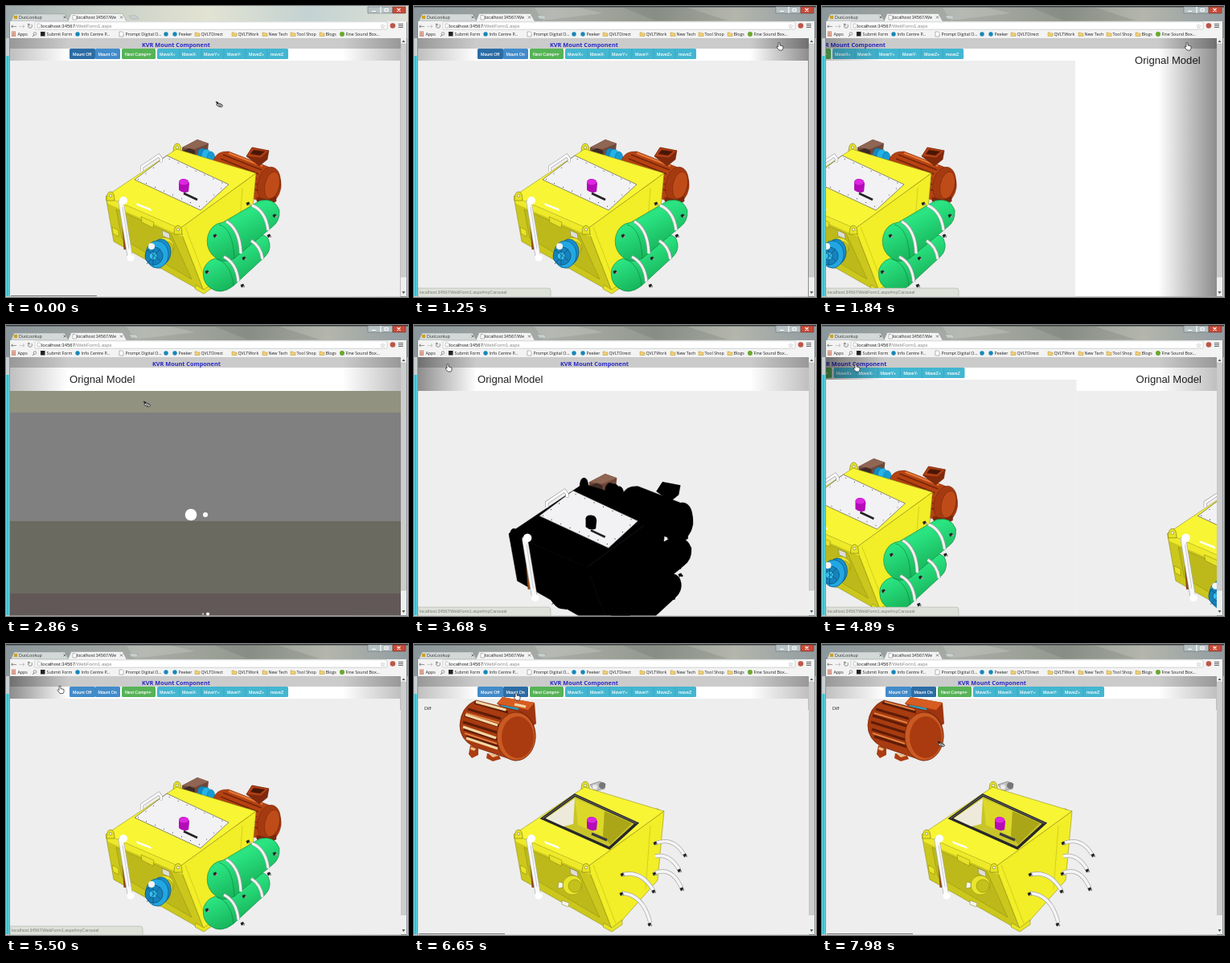
Recreate the animation shown at these times as an HTML page. Size 500 by 362 pixels, loop 8 s.

```html
<!DOCTYPE html>
<html lang="en">
<head>
<meta charset="utf-8">
<title>Mount Component</title>
<style>
html, body { margin: 0; width: 100%; height: 100%; overflow: hidden; background: #eee; }
#stage { display: block; width: 500px; height: 362px; font: 5.3px "Open Sans", sans-serif; }
.arial { font-family: "Liberation Sans", sans-serif; }
.icon { font-family: "DejaVu Sans", sans-serif; }
.title { font-weight: 700; font-size: 7.3px; fill: #2929c8; }
.head { font-size: 13.1px; fill: #222; }
.button { font-size: 5.3px; fill: #fff; stroke: #fff; stroke-width: .12; }
.dark { filter: brightness(0); }
</style>
</head>
<body>
<svg id="stage" viewBox="0 0 500 362">
<defs>
  <linearGradient id="bright">
    <stop offset="0" stop-color="#9eabac"/><stop offset=".25" stop-color="#c9cfc6"/>
    <stop offset=".5" stop-color="#e2e3d2"/><stop offset=".75" stop-color="#c3d2d2"/><stop offset="1" stop-color="#dde0d6"/>
  </linearGradient>
  <linearGradient id="dull">
    <stop offset="0" stop-color="#8c979b"/><stop offset=".35" stop-color="#a9aca5"/>
    <stop offset=".6" stop-color="#94998f"/><stop offset=".8" stop-color="#b4b6ac"/><stop offset="1" stop-color="#929ca1"/>
  </linearGradient>
  <linearGradient id="shadeL"><stop offset="0" stop-opacity=".5"/><stop offset="1" stop-opacity="0"/></linearGradient>
  <linearGradient id="shadeR"><stop offset="0" stop-opacity="0"/><stop offset="1" stop-opacity=".5"/></linearGradient>
  <linearGradient id="green" x2=".6" y2="1">
    <stop offset="0" stop-color="#20c763"/><stop offset=".4" stop-color="#2be582"/><stop offset="1" stop-color="#12a850"/>
  </linearGradient>

  <g id="lug"><path d="M-5 6Q-5-5 0-5T5 6Z" fill="#e8e426" stroke="#77740c" stroke-width=".6"/><circle r="1.8" fill="#eee" stroke="#77740c" stroke-width=".5"/></g>
  <g id="clamp"><path d="M-2.5-1 1-2.5 2.5 0-1 2.5Z" fill="#222"/><circle cx="2" cy="1" r="1.2" fill="#999"/></g>

  <g id="gear">
    <path d="M219 176 238 166 252 171 251 179 236 186 219 181Z" fill="#70483a"/>
    <path d="M219 176 238 166 252 171 235 178Z" fill="#8f6553"/>
    <path d="M220 180l8-3 7 3v5Z" fill="#3e2a25"/>
  </g>
  <g id="coupling" stroke="#086d98" stroke-width=".5">
    <ellipse cx="244" cy="185" rx="6" ry="8" fill="#1488c0"/><ellipse cx="249" cy="187" rx="6" ry="9" fill="#25b2e6"/><ellipse cx="255" cy="190" rx="5" ry="9" fill="#159bd2"/>
  </g>
  <g id="motor" stroke="#71230a" stroke-width=".5">
    <path d="M258 193Q261 180 277 181L326 200Q344 208 342 226 339 243 325 246L300 237 262 214Z" fill="#b54212"/>
    <path d="M270 185 318 204M267 190 314 209M264 195 312 215M262 201 312 222M262 207 314 230" fill="none" stroke="#74250a" stroke-width="1.4"/>
    <path d="M277 183 319 199" stroke="#e87a35" stroke-width="2"/>
    <ellipse cx="327" cy="222" rx="14" ry="22" transform="rotate(12 327 222)" fill="#a53a10"/>
    <ellipse cx="331" cy="223" rx="9" ry="17" transform="rotate(12 331 223)" fill="#bf4c18"/>
    <path d="M299 187 306 176 327 180 325 191 315 199Z" fill="#80290c"/>
    <path d="M299 187 306 176 327 180 317 189Z" fill="#b04015"/><path d="M304 184 308 179 322 181 316 186Z" fill="#491606"/>
    <path d="M312 238 326 241 336 237 336 243 326 248 312 243Z" fill="#7c280c"/>
  </g>
  <g id="shaft"><path d="M219 175 231 171 238 174 237 180 225 183Z" fill="#c4c4c4" stroke="#666" stroke-width=".6"/><circle cx="234" cy="176" r="4" fill="#777"/><circle cx="225" cy="178" r="3" fill="#ececec"/></g>
  <g id="body" stroke="#817e0c" stroke-width=".5">
    <use href="#lug" x="213" y="176"/><use href="#lug" x="302" y="210"/>
    <path d="M124 237 212 178 311 208 216 277Z" fill="#f8f535"/>
    <path d="M124 237 216 277 247 357 134 293Z" fill="#cbc71d"/>
    <path d="M216 277 311 208 303 294 247 357Z" fill="#f2ee27"/>
    <path d="M124 237 216 277 220 287 127 246Z" fill="#eeea29" stroke="none"/>
    <path d="M137 253 205 283 231 340 144 289Z" fill="#bdb91b" stroke-width=".4"/>
    <path d="M216 277 247 357M223 275 251 348M294 226 288 305" fill="none" stroke="#b5b119"/>
    <path d="M168 262 184 269 183 276 169 269Z" fill="#e6e229"/>
    <path d="M162 245 180 252 181 255 163 248Z" fill="#fff" stroke="none"/>
    <path d="M194 279 203 283 204 290 195 286Z" fill="#ddd"/>
    <circle cx="197" cy="300" r="12" fill="#e9e52b"/><circle cx="200" cy="301" r="8" fill="#c5c11c"/>
    <path d="M184 319 193 322 192 327 184 324ZM180 296l5 1v6l-6 1Z" fill="#f5f5f5"/>
    <path d="M132 275l8 4v8l-7-4ZM236 347l10 6 13-10v6l-13 9-11-6Z" fill="#e8e426"/>
    <use href="#lug" x="130" y="236"/><use href="#lug" x="214" y="278"/>
  </g>
  <g id="lid">
    <path d="M160 216 200 186 277 222 242 254Z" fill="#f2f2f4" stroke="#444" stroke-width=".6"/>
    <path d="M164 216 200 189 273 222 242 250Z" fill="none" stroke="#333" stroke-dasharray="1 11"/>
    <path d="M169 206V200L190 186 193 190V194" fill="none" stroke="#999" stroke-width="4"/>
    <path d="M169 206V200L190 186 193 190V194" fill="none" stroke="#fff" stroke-width="2.8"/>
    <path d="M221 233 238 241" stroke="#222" stroke-width="2.5"/>
  </g>
  <g id="hole">
    <path d="M160 217 200 188 277 223 243 254Z" fill="#c8c42a" stroke="#27272b" stroke-width="3.5"/>
    <path d="M164 217 200 192 198 224 186 227Z" fill="#eeeadb"/><path d="M200 192 237 208 235 239 204 225Z" fill="#dcd829"/>
    <path d="M237 208 271 223 244 249 235 239Z" fill="#aaa618"/><path d="M221 236 240 244" stroke="#39393d" stroke-width="3"/>
    <path d="M160 217 200 188 277 223" fill="none" stroke="#888" stroke-width=".7"/>
  </g>
  <g id="knob" fill="#b40bb8"><path d="M215 220Q215 215 221 215T228 221L227 231Q221 234 215 229Z"/><ellipse cx="221" cy="219" rx="6" ry="3.5" fill="#dc27df"/></g>
  <g id="valve" fill="#178fce" stroke="#0a4f78" stroke-width=".7">
    <ellipse cx="193" cy="306" rx="12" ry="16"/><ellipse cx="188" cy="309" rx="14" ry="17" fill="#22a7e2"/>
    <circle cx="184" cy="311" r="11" fill="#1683bd"/><circle cx="183" cy="311" r="5" fill="#37c2f0"/>
    <path d="M175 303l17 14M192 302l-17 19M183 297v27" fill="none"/>
    <circle cx="181" cy="299" r="4" fill="#f5f5f5" stroke="none"/>
  </g>
  <g id="pipe">
    <path d="M146 275 148 303" stroke="#8e4a16" stroke-width="3"/>
    <path d="M143 244 154 310" stroke="#aaa" stroke-width="7" stroke-linecap="round"/>
    <path d="M143 244 154 310" stroke="#f8f8f8" stroke-width="5.6" stroke-linecap="round"/>
    <path d="M145 250 153 302" stroke="#ccc"/><circle cx="146" cy="242" r="5" fill="#fff"/><circle cx="155" cy="313" r="4.5" fill="#fff"/>
  </g>
  <path id="strap" d="M274 268Q291 278 292 308M306 248Q323 255 326 279M271 312Q287 320 289 343M305 292Q317 299 319 315"/>
  <g id="tanks">
    <g fill="url(#green)" stroke="#0b7e3b" stroke-width=".6">
      <path d="M246 327Q251 314 266 313L310 286Q326 281 328 296 329 305 322 312L283 348Q267 361 253 350 243 342 246 327Z"/>
      <path d="M251 286Q255 271 270 269L316 242Q334 238 340 254 341 268 331 275L284 314Q269 323 256 309 248 299 251 286Z"/>
      <path d="M265 272Q282 276 284 314M262 315Q280 320 283 348" fill="none"/>
    </g>
    <g fill="none"><use href="#strap" stroke="#8f9f93" stroke-width="4.4"/><use href="#strap" stroke="#f2f2f2" stroke-width="3"/></g>
    <use href="#clamp" x="301" y="246"/><use href="#clamp" x="334" y="261"/><use href="#clamp" x="260" y="286"/><use href="#clamp" x="296" y="314"/><use href="#clamp" x="327" y="286"/><use href="#clamp" x="294" y="348"/><use href="#clamp" x="250" y="331"/>
  </g>
  <path id="tube" d="M300 248Q322 239 336 262M299 285Q321 276 333 304M259 287Q283 281 298 307M258 310Q285 311 294 347M300 264Q318 260 330 281"/>
  <g id="hoses">
    <g fill="none"><use href="#tube" stroke="#a8a8a8" stroke-width="5"/><use href="#tube" stroke="#f5f5f5" stroke-width="3.6"/></g>
    <use href="#clamp" x="300" y="248"/><use href="#clamp" x="337" y="263"/><use href="#clamp" x="299" y="286"/><use href="#clamp" x="333" y="305"/><use href="#clamp" x="259" y="287"/><use href="#clamp" x="298" y="308"/><use href="#clamp" x="258" y="311"/><use href="#clamp" x="293" y="349"/><use href="#clamp" x="330" y="282"/>
  </g>
  <g id="bigmotor">
    <path d="M103 74 110 66 150 73 152 99 143 105Z" fill="#9e3510"/><path d="M103 74 110 66 150 73 142 82Z" fill="#d65c22"/><path d="M108 77 130 81" stroke="#29a0c5" stroke-width="2.5"/>
    <path d="M70 126 80 130 80 138 72 142 68 137ZM91 136 106 139 108 143 98 146 90 142Z" fill="#ac3c12"/>
    <path d="M57 101Q58 78 77 70L129 83Q152 91 151 117 146 145 125 145L75 128Q57 119 57 101Z" fill="#a83b10" stroke="#6e2108" stroke-width=".7"/>
    <path d="M75 73 117 85M67 81 108 93M63 89 105 102M61 97 103 110M62 106 103 119M65 115 106 128" stroke="#5d1c07" stroke-width="3"/>
    <path d="M78 72 115 82M65 86 106 98M63 111 103 124" stroke="#e98e4b" stroke-width="1.5"/>
    <ellipse cx="127" cy="115" rx="24" ry="30" fill="#ca5a23" stroke="#6e2108" stroke-width=".7"/>
    <ellipse cx="129" cy="116" rx="20" ry="26" fill="#aa3b10"/>
    <path d="M71 128 77 130 75 133 70 131ZM92 136 105 139 98 141Z" fill="#f2bd83"/>
  </g>
</defs>

<rect width="500" height="362" fill="#c8cfd2"/>
<rect id="bar" width="500" height="40"/>
<g id="edge" fill="#343a3c"><path d="M0 0H500V1.5H0Z"/><path d="M150 2 205 2 235 9 160 18Z" fill="#fff" opacity=".15"/><path d="M260 2 340 2 390 18 300 18Z" opacity=".12"/></g>
<path d="M.5 62H3.5V361H.5Z" fill="#18cbe2"/><path d="M4.5 20V361.5H498.5V20" fill="none" stroke="#7d878b" stroke-width=".8"/>
<path d="M450 1H481V9H450Z" fill="#b9c3c5" stroke="#65757b" stroke-width=".6"/><path d="M481 1H497V9H481Z" fill="#c94b39" stroke="#6f2a22" stroke-width=".6"/>
<path d="M455 6.5h5M471 3.5h4v3h-4ZM466 1v8M486.5 3l4 4m0-4-4 4" fill="none" stroke="#fff" stroke-width="1.1"/>
<path d="M6 19 10 10H73L78 19Z" fill="#d3d9d8" stroke="#89918f" stroke-width=".5"/>
<path d="M5 19H77L81 9.5H145L150 19H498V40H5Z" fill="#f2f3f2"/><path d="M77 19 81 9.5H145L150 19" fill="none" stroke="#89918f" stroke-width=".5"/>
<path d="M153 12h9l3 4h-9Z" fill="#c9d0cf" stroke="#899" stroke-width=".4"/>
<rect x="10" y="12" width="4" height="4" fill="#c9a227"/><path d="M83 11.5h3l1.5 1.5v4H83Z" fill="#fff" stroke="#777" stroke-width=".5"/>
<g fill="#333"><text x="16" y="16">DuoLookup</text><text x="88" y="16" class="arial" font-size="5.6">localhost:34567/We</text></g>
<path d="M71.5 12.5l3 3m0-3-3 3M142 12.5l3 3m0-3-3 3" stroke="#666" stroke-width=".8"/>
<rect x="36" y="19.8" width="438" height="9.4" rx="1" fill="#fff" stroke="#b5b9ba" stroke-width=".6"/>
<g class="icon" font-size="9" fill="#777"><text x="6" y="27.5">←</text><text x="16" y="27.5" fill="#bbb">→</text><text x="26" y="27.5">↻</text><text x="465" y="27.5" font-size="8">☆</text></g>
<path d="M39 22h3l1 1v4h-4Z" fill="#fff" stroke="#888" stroke-width=".5"/>
<text x="44" y="26.5" class="arial" font-size="6" fill="#222">localhost:34567<tspan fill="#888">/WebForm1.aspx</tspan></text>
<circle cx="481" cy="24.5" r="3.3" fill="#bd5648"/><path d="M488 22.5h6m-6 2h6m-6 2h6" stroke="#666"/>
<g id="bookmarks" fill="#222"></g>

<svg x="5" y="40" width="486" height="321.5" viewBox="5 40 486 321.5">
  <rect x="5" y="40" width="486" height="322" fill="#fff"/>
  <rect x="5" y="40" width="486" height="13" fill="#cbcbcb"/>
  <g class="slide">
    <text class="title" x="169" y="51">KVR Mount Component</text>
    <g id="buttons"></g>
    <text class="title" x="667" y="51">KVR Mount Component</text>
    <text class="head arial" x="564" y="72">Orignal Model</text>
  </g>
  <rect id="left" x="5" y="40" width="73" height="322" fill="url(#shadeL)"/>
  <rect id="right" x="418" y="40" width="73" height="322" fill="url(#shadeR)"/>
  <g class="slide">
    <rect x="5" y="68" width="485" height="294" fill="#eee"/>
    <g id="whole"></g>
    <g id="diff"><text x="13" y="82" class="arial" font-size="5.6" fill="#333">Diff</text></g>
    <path id="rough" d="M77 72 114 82M64 88 104 101M61 103 102 117M65 117 104 130M125 75 139 78" stroke="#f3d6a3" stroke-width="3"/>
    <path d="M6 360.5H113" stroke="#777"/>
    <g id="second" transform="translate(485)">
      <rect x="5" y="82" width="486" height="280" fill="#eee"/>
      <g id="loaded" transform="translate(-12.2 10.7) scale(1.05)"></g>
      <g id="loading">
        <path d="M5 82H491V109H5Z" fill="#929280"/><path d="M5 109H491V244H5Z" fill="#808080"/>
        <path d="M5 244H491V334H5Z" fill="#6a6a61"/><path d="M5 334H491V362H5Z" fill="#625857"/>
        <g fill="#fff"><circle id="dotA" cx="230" cy="236"/><circle id="dotB" cx="248" cy="236"/><circle cx="251" cy="359.5" r="2"/><circle cx="245" cy="359.5" r="1.2" fill="#bbb"/></g>
      </g>
    </g>
  </g>
  <g id="status"><path d="M5 351H167Q170 351 170 354V362H5Z" fill="#dde1d8" stroke="#aeb3aa" stroke-width=".6"/><text x="7" y="358" class="arial" fill="#7a7e78">localhost:34567/WebForm1.aspx#myCarousel</text></g>
</svg>
<rect x="491" y="40" width="7" height="321" fill="#efefef"/><rect id="thumb" x="491.5" y="47" width="6" fill="#cdcdcd" stroke="#aaa" stroke-width=".4"/>
<path d="M492.5 45 494.5 42.5 496.5 45ZM492.5 355 494.5 358 496.5 355Z" fill="#555"/>
<g id="cursor" stroke="#222" stroke-width=".7" fill="#fff">
  <path id="hand" d="M-2-4Q-1-5 0-4V-1L4 0V3L3 5H-1L-4 1-3 0-2 1Z"/>
  <g id="orbit"><ellipse cx="1" cy="1" rx="4" ry="2" transform="rotate(20)" fill="#ccc"/><path d="M-4-3-1-2-2 0Z" fill="#222"/><circle cx="1" cy="1" r="1.3"/></g>
</g>
</svg>

<script>
const $ = id => document.getElementById(id);
const show = (el, on) => el.style.display = on ? '' : 'none';
const within = (t, a, b) => t >= a && t < b;
const smooth = (t, a, b) => { const p = Math.min(1, Math.max(0, (t - a) / (b - a))); return p * p * (3 - 2 * p); };
const uses = names => names.split(' ').map(n => `<use href="#${n}"/>`).join('');

const icons = {
  grid: x => `<path d="M${x} 32.5h5m-5 2.3h5m-5 2.3h5" stroke="#c65b3a" stroke-width="1.5" stroke-dasharray="1.4 .4"/>`,
  lens: x => `<path d="M${x} 38l2-2" stroke="#777"/><circle cx="${x + 3}" cy="34.5" r="1.8" fill="none" stroke="#777" stroke-width=".7"/>`,
  black: x => `<rect x="${x}" y="32" width="5.5" height="5.5"/>`,
  blue: x => `<circle cx="${x + 3}" cy="35" r="2.7" fill="#1787b8"/>`,
  page: x => `<path d="M${x} 32h3.5l1.5 1.5v4.5h-5Z" fill="#fff" stroke="#888" stroke-width=".6"/>`,
  folder: x => `<path d="M${x} 33h2.5l1 1H${x + 6}v3.5H${x}Z" fill="#f0cf73" stroke="#b8923a" stroke-width=".5"/>`,
  green: x => `<circle cx="${x + 3}" cy="35" r="3" fill="#6aa82c"/>`
};
$('bookmarks').innerHTML = [
  [7, 'grid', 'Apps'], [33, 'lens', ''], [43, 'black', 'Submit Form'], [86, 'blue', 'Info Centre P...'],
  [141, 'page', 'Prompt Digital O...'], [196, 'blue', ''], [207, 'blue', 'Peeker'], [235, 'folder', 'QVLTDirect'],
  [281, 'folder', 'QVLTWork'], [319, 'folder', 'New Tech'], [354, 'folder', 'Tool Shop'], [390, 'folder', 'Blogs'],
  [415, 'green', 'Fine Sound Box...']
].map(([x, icon, label]) => icons[icon](x) + `<text x="${x + 7.5}" y="37">${label}</text>`).join('');

const box = (id, x, w, fill) => `<rect id="${id}" x="${x}" y="53" width="${w}" height="13" rx="1.5" fill="${fill}"/>`;
const labels = [[83, 'Mount Off'], [114.5, 'Mount On'], [148, 'Next Comp&gt;&gt;'], [191, 'MoveX+'], [219, 'MoveX-'],
  [246, 'MoveY+'], [275, 'MoveY-'], [302, 'MoveZ+'], [329, 'moveZ']];
$('buttons').innerHTML = box('off', 79, 32, '') + box('on', 111, 31, '') + box('next', 144, 42, '#57b357') + box('moves', 188, 163, '#43b6d1') +
  labels.map(([x, s]) => `<text class="button arial" x="${x}" y="61.5">${s}</text>`).join('') +
  '<path d="M111 53v13M216 53v13M243 53v13M271 53v13M298 53v13M325 53v13" stroke="#2d94b4" stroke-width=".4"/>';

$('whole').innerHTML = $('loaded').innerHTML = uses('gear coupling motor body lid knob valve pipe tanks');
$('diff').innerHTML += uses('shaft body hole knob pipe hoses bigmotor');
const loadedParts = [...$('loaded').children];
const alwaysLit = ['#gear', '#lid', '#pipe'];
const slides = document.querySelectorAll('.slide');

// Pointer stops: time, x, y
const stops = [[0, 265, 122], [430, 265, 122], [1190, 455, 50], [2110, 455, 50], [2850, 175, 98], [2920, 175, 98],
  [3640, 43, 53], [5300, 43, 53], [5860, 128, 65], [6700, 128, 65], [7440, 150, 90], [7680, 156, 106], [7960, 148, 124], [8001, 148, 124]];
function pointer(t) {
  const i = stops.findIndex(s => s[0] > t), [a, x, y] = stops[i - 1], [b, u, v] = stops[i];
  const p = smooth(t, a, b);
  return [x + (u - x) * p, y + (v - y) * p];
}

function draw(t) {
  const shift = -485 * (smooth(t, 1638, 2138) - smooth(t, 4593, 5093));
  slides.forEach(s => s.setAttribute('transform', `translate(${shift})`));

  const awake = t < 1250, diff = t >= 6650;
  $('bar').setAttribute('fill', `url(#${awake ? 'bright' : 'dull'})`);
  show($('edge'), !awake);
  $('off').setAttribute('fill', t < 1638 ? '#2b6ca5' : '#428bca');
  $('on').setAttribute('fill', t >= 6450 ? '#2b6ca5' : '#428bca');
  $('thumb').setAttribute('height', within(t, 2138, 5093) ? 283 : 290);
  show($('whole'), !diff);
  show($('diff'), diff);
  show($('rough'), within(t, 6650, 6900));

  show($('second'), t >= 2138);
  show($('loading'), t < 3060);
  const pulse = Math.cos((t - 2860) / 150);
  $('dotA').setAttribute('r', 5 + 2.3 * pulse);
  $('dotB').setAttribute('r', 5 - 2 * pulse);
  loadedParts.forEach((part, i) => {
    show(part, t >= 3080 + 60 * i);
    part.classList.toggle('dark', t < 3740 + 40 * i && !alwaysLit.includes(part.getAttribute('href')));
  });

  const [x, y] = pointer(t), hand = y < 68;
  $('cursor').setAttribute('transform', `translate(${x} ${y})`);
  show($('hand'), hand);
  show($('orbit'), !hand);
  $('left').setAttribute('opacity', hand && x < 78 ? .9 : .5);
  $('right').setAttribute('opacity', hand && x > 418 ? .9 : .5);
  show($('status'), within(t, 1050, 2400) || within(t, 3500, 5960));
}

const start = performance.now();
(function tick() {
  draw((performance.now() - start) % 8000);
  requestAnimationFrame(tick);
})();
</script>
</body>
</html>
```
